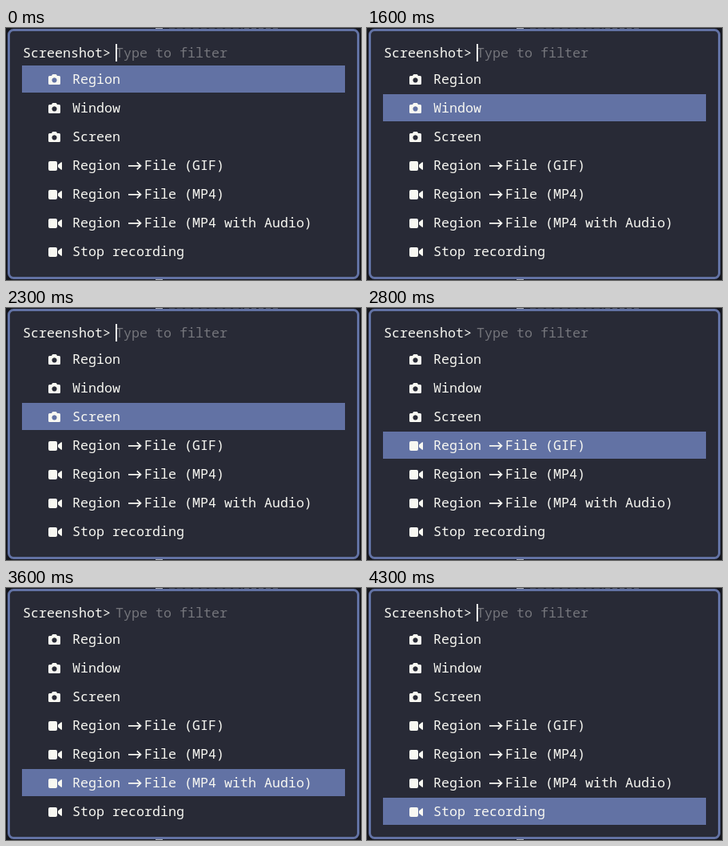
Write an HTML page that moves like this. It is 444x316 px and loops after 4600 ms.

```html
<!DOCTYPE html>
<html lang="en">
<head>
<meta charset="utf-8">
<title>Screenshot menu</title>
<style>
html, body { margin: 0; width: 100%; height: 100%; overflow: hidden; background: #16171e; }
svg { display: block; width: 444px; height: 316px; }
text {
  font: 16.667px "Noto Sans Mono", "DejaVu Sans Mono", monospace;
  fill: #f8f8f2;
  white-space: pre;
}
.hint { fill: #74757b; }
.icon { fill: #f8f8f2; fill-rule: evenodd; }
.arrow { fill: none; stroke: #f8f8f2; stroke-width: 1.7; }
.bar { fill: #6272a4; animation: pick 4.6s step-end infinite; }
.caret { fill: #f8f8f2; animation: blink 4.6s step-end infinite; }

/* one row down every 500 ms, starting at 1600 ms */
@keyframes pick {
  0% { transform: translateY(0); }
  34.78% { transform: translateY(36px); }
  45.65% { transform: translateY(72px); }
  56.52% { transform: translateY(108px); }
  67.39% { transform: translateY(144px); }
  78.26% { transform: translateY(180px); }
  89.13%, 100% { transform: translateY(216px); }
}
@keyframes blink {
  0% { opacity: 1; }
  8.69% { opacity: 0; }
  34.78% { opacity: 1; }
  60.86% { opacity: 0; }
  86.95%, 100% { opacity: 1; }
}
</style>
</head>
<body>
<svg viewBox="0 0 444 316">
  <defs>
    <path id="camera" class="icon" d="M54.5 60H57l.8-1.5q.3-.5.9-.5h3.6q.6 0 .9.5L64 60h2.500q1.500 0 1.500 1.500v8q0 1.500-1.500 1.500h-12q-1.500 0-1.500-1.500v-8q0-1.500 1.500-1.500zM60.500 62.300a3.100 3.100 0 1 0 .01 0z"/>
    <path id="video" class="icon" d="M55 59h7q2 0 2 2v8q0 2-2 2h-7q-2 0-2-2v-8q0-2 2-2zM65 63.500l4-3.200q1-.5 1 .5v8.400q0 1-1 .5l-4-3.200z"/>
    <path id="arrow" class="arrow" d="M153 64.800h15.500M163.800 60.300l4.700 4.500-4.700 4.500"/>
  </defs>

  <path d="M187 .5h9M187 315.500h9" stroke="#a4a5a8"/>
  <path d="M204 .5h92" stroke="#33353d" stroke-dasharray="7 3"/>
  <path d="M298 .5h45" stroke="#4a4c54" stroke-dasharray="6 3"/>
  <rect x="3.500" y="2.500" width="437" height="311" rx="6" fill="#282a36" stroke="#6272a4" stroke-width="3"/>

  <text x="21" y="37">Screenshot&gt;</text>
  <text x="137" y="37" class="hint">Type to filter</text>
  <rect class="caret" x="137" y="20" width="2" height="22"/>
  <rect class="bar" x="20" y="47" width="404" height="34"/>
  <g id="rows"></g>
</svg>
<script>
const items = [
  ["camera", "Region"],
  ["camera", "Window"],
  ["camera", "Screen"],
  ["video", "Region", "File (GIF)"],
  ["video", "Region", "File (MP4)"],
  ["video", "Region", "File (MP4 with Audio)"],
  ["video", "Stop recording"]
];
const label = (x, s) => `<text x="${x}" y="70">${s}</text>`;

document.getElementById("rows").innerHTML = items.map(([icon, name, file], i) =>
  `<g transform="translate(0 ${i * 36})"><use href="#${icon}"/>${label(83, name)}` +
  (file ? `<use href="#arrow"/>${label(173, file)}` : "") + "</g>"
).join("");
</script>
</body>
</html>
```
